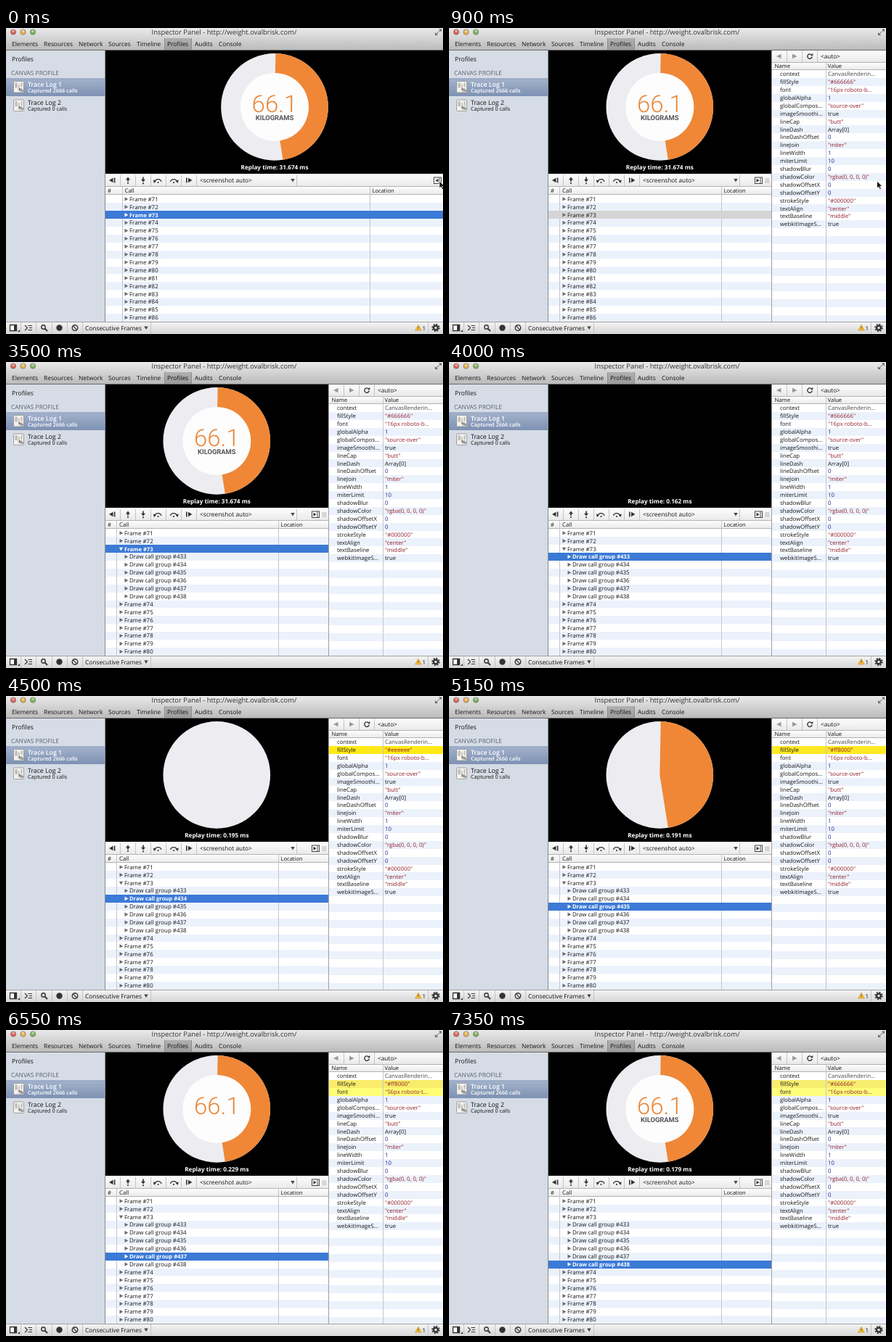
Animation, 602 px wide and 422 px high, one loop 7400 ms. Source, as an HTML page:

```html
<!DOCTYPE html>
<html lang="en">
<head>
<meta charset="utf-8">
<title>Canvas profile replay</title>
<style>
  html, body { margin: 0; width: 100%; height: 100%; overflow: hidden; background: #fff; }
  svg { display: block; width: 602px; height: 422px; }
  text { font-family: "Open Sans", "Noto Sans", sans-serif; text-rendering: geometricPrecision; white-space: pre; }
  .dial { font-family: Roboto, sans-serif; }
</style>
</head>
<body>
<svg viewBox="0 0 602 422" xmlns="http://www.w3.org/2000/svg">
  <defs>
    <linearGradient id="top" x2="0" y2="1"><stop stop-color="#e9e9e9"/><stop offset="1" stop-color="#bababa"/></linearGradient>
    <linearGradient id="bar" x2="0" y2="1"><stop stop-color="#fdfdfd"/><stop offset="1" stop-color="#e9e9e9"/></linearGradient>
    <linearGradient id="foot" x2="0" y2="1"><stop stop-color="#f5f5f5"/><stop offset="1" stop-color="#d6d6d6"/></linearGradient>
    <linearGradient id="pick" x2="0" y2="1"><stop stop-color="#a4b3cc"/><stop offset="1" stop-color="#7d91b3"/></linearGradient>
  </defs>
  <g id="chrome"></g>
  <g id="main"></g>
  <g id="panel"></g>
  <path id="cursor" d="M0 0V10.2L2.4 8L4 11.7L5.8 10.9L4.2 7.3H7.3Z" fill="#111" stroke="#fff" stroke-width=".8"/>
</svg>
<script>
const LOOP = 7400, PITCH = 10.9, TINT = '#ecf2fc', INK = '#141414';
const byId = id => document.getElementById(id);
const esc = s => s.replace(/&/g, '&amp;').replace(/</g, '&lt;');

// Small builders for SVG markup
const rect = (x, y, w, h, fill, more = '') =>
  `<rect x="${x}" y="${y}" width="${w}" height="${h}" fill="${fill}" ${more}/>`;
const disc = (x, y, r, fill, more = '') => `<circle cx="${x}" cy="${y}" r="${r}" fill="${fill}" ${more}/>`;
const path = (d, fill = '#333', more = '') => `<path d="${d}" fill="${fill}" ${more}/>`;
const line = (d, color = '#333', width = 1.3) => path(d, 'none', `stroke="${color}" stroke-width="${width}"`);
const text = (x, y, s, size = 8, fill = INK, more = '') =>
  `<text x="${x}" y="${y}" font-size="${size}" fill="${fill}" ${more}>${esc(s)}</text>`;
const seps = (xs, y, h, color = '#c4c4c4') => xs.map(x => rect(x, y, 1, h, color)).join('');
const right = (x, y, fill = '#666') => path(`M${x - 2} ${y - 2.7}L${x + 2.8} ${y}L${x - 2} ${y + 2.7}Z`, fill);
const down = (x, y, fill = '#666') => path(`M${x - 2.7} ${y - 2}H${x + 2.7}L${x} ${y + 2.6}Z`, fill);

// A table row, snapped to whole pixels
const stripe = (x, y, w, fill, more) => {
  const a = Math.round(y), b = Math.min(405, Math.round(y + PITCH));
  return rect(x, a, w, b - a, fill, more);
};

const BOLD = 'font-weight="700"';
const MID = 'text-anchor="middle"';

function chrome() {
  const tabs = [['Elements', 8], ['Resources', 52], ['Network', 100], ['Sources', 141], ['Timeline', 180],
    ['Profiles', 222], ['Audits', 260], ['Console', 293]];
  let s = rect(0, 0, 602, 31, 'url(#top)');
  [['#dd6055', 10], ['#e3b04c', 23.5], ['#7ab356', 37]].forEach(([c, x]) => {
    s += disc(x, 5.6, 3.7, c, 'stroke="#777" stroke-width=".7"') + disc(x, 4.2, 1.6, '#fff', 'opacity=".5"');
  });
  s += text(300.5, 8.9, 'Inspector Panel - http://weight.ovalbrisk.com/', 9.45, '#333', MID);
  s += path('M596 1.5H600V5.5ZM591 6V10H595Z', '#666') + line('M592 9L599 2.4', '#666', 1);
  s += rect(218, 14, 38, 16, '#000', 'opacity=".17"') + seps([218, 255], 14, 16, '#8d8d8d');
  tabs.forEach(([n, x]) => { s += text(x, 25.1, n, 8.4); });
  s += rect(0, 30, 602, 1, '#6a6a6a');

  s += rect(0, 31, 136, 375, '#d6dce5') + rect(136, 31, 1, 375, '#868a92');
  s += text(8, 45.7, 'Profiles', 8.6) + text(7, 65.3, 'CANVAS PROFILE', 8.4, '#59626f');
  s += rect(0, 69.5, 136, 24.5, 'url(#pick)') + rect(0, 69.5, 136, 1, '#8c9fbe');
  [['Trace Log 1', 'Captured 2666 calls', 69.5, '#fff', 'font-weight="600"'],
   ['Trace Log 2', 'Captured 0 calls', 95, INK, '']].forEach(([a, b, y, c, w]) => {
    s += rect(10.5, y + 4, 14, 15.5, '#f4f2ee', 'stroke="#8f8f8f" stroke-width=".8" rx="1"');
    s += rect(12.5, y + 6, 3, 7, '#b9b9b9') + rect(16.5, y + 8, 2.5, 9, '#cfcac2') + rect(20.5, y + 6, 2, 6, '#c0bcb5');
    s += text(17.5, y + 18, '%', 7, '#666', BOLD);
    s += text(30, y + 11.2, a, 8.75, c, w) + text(30, y + 19.4, b, 7.3, c, w);
  });

  s += rect(0, 405, 602, 17, 'url(#foot)') + rect(0, 405, 602, 1, '#a2a2a2');
  s += seps([20, 41, 63, 84, 105, 199], 406, 16);
  s += path('M5.5 409.5H14.5V417.5H5.5Z', '#fff', 'stroke="#333" stroke-width="1.3"') + rect(11, 410, 3.5, 7.5, '#333');
  s += path('M16 419H19V416Z');
  s += line('M26 410L29.5 413.5L26 417M30.5 410.5H36M32 413.5H36M30.5 416.5H36', '#333', 1.2);
  s += disc(51.5, 412.5, 2.7, 'none', 'stroke="#333" stroke-width="1.4"') + line('M53.5 414.5L57 418', '#333', 1.8);
  s += disc(73.5, 413.5, 4.2, '#333') + disc(95, 413.5, 3.8, 'none', 'stroke="#333" stroke-width="1.4"');
  s += line('M92.4 410.9L97.6 416.1');
  s += text(109, 416.6, 'Consecutive Frames', 8.35) + down(193, 413.5, '#444');
  s += path('M568 409.3L572.3 417H563.7Z', '#f4bd35', 'stroke="#c48a1c" stroke-width=".6"') + rect(567.6, 411.8, .9, 3, '#553');
  s += text(573.5, 416.6, '1', 8) + seps([581], 406, 16);
  s += disc(592, 413.5, 3, 'none', 'stroke="#333" stroke-width="2.4"');
  s += disc(592, 413.5, 4.9, 'none', 'stroke="#333" stroke-width="1.6" stroke-dasharray="1.92 1.92"');
  return s;
}

function dial(cx, step, ms) {
  const cy = 108.9, R = 73.8;
  const at = deg => {
    const a = deg * Math.PI / 180;
    return `${cx + R * Math.sin(a)} ${cy - R * Math.cos(a)}`;
  };
  const parts = [
    disc(cx, cy, R, '#ededf1'),
    path(`M${cx} ${cy}L${at(1.1)}A${R} ${R} 0 0 1 ${at(171)}Z`, '#ef8737'),
    disc(cx, cy, 47, '#fdfdfd'),
    text(cx, 115.5, '66.1', 33, '#e8873a', `class="dial" font-weight="300" ${MID}`),
    text(cx, 127.3, 'KILOGRAMS', 9.4, '#55555b', `class="dial" font-weight="600" ${MID}`)
  ];
  return parts.slice(0, step).join('') + text(cx, 194.6, `Replay time: ${ms} ms`, 8.2, '#fff', `${BOLD} ${MID}`);
}

function replayBar(open, edge) {
  let s = rect(137, 201, edge - 137, 18, 'url(#bar)') + rect(137, 218, edge - 137, 1, '#b4b4b4');
  s += seps([157, 178, 199, 220, 241, 262, 400], 203, 15);
  s += path('M142 210L147.5 206.8V213.2Z') + rect(148.8, 206.5, 1.6, 7, '#333');
  s += path('M168 205.5L171 209.5H165Z') + rect(167.2, 209, 1.6, 3, '#333') + disc(168, 214, 1.1, '#333');
  s += path('M189 212.5L192 208.8H186Z') + rect(188.2, 205.5, 1.6, 4, '#333') + disc(189, 214.3, 1.1, '#333');
  s += line('M205 212A4.6 4.2 0 0 1 214 212') + path('M202.8 209.5L207 210.8L204 214Z') + disc(209.5, 213, 1.1, '#333');
  s += line('M226.5 212A4.6 4.2 0 0 1 235.5 212') + path('M237.8 209.5L233.6 210.8L236.6 214Z') + disc(231, 213, 1.1, '#333');
  s += rect(248, 206.5, 1.6, 7, '#333') + path('M251 206.8L256.5 210L251 213.2Z');
  s += text(267, 212.7, '<screenshot auto>', 8.3) + down(395, 210, '#444');
  const bx = open ? 421.5 : 589.5;
  s += rect(bx, 206, 10, 8.5, '#fff', 'stroke="#444"');
  s += open ? path(`M${bx + 2} 207.7L${bx + 6} 210.2L${bx + 2} 212.8Z`) : path(`M${bx + 6} 207.7L${bx + 2} 210.2L${bx + 6} 212.8Z`);
  s += rect(bx + 7, 206.5, 1, 7.5, '#444');
  return s + (open ? seps([436, 438, 440], 207, 7, '#bbb') : '');
}

function callRows({ open, sel, focus, expanded }, edge) {
  const labelX = open ? 163 : 170, rows = [];
  for (let n = 71; n <= 86; n++) {
    const own = expanded && n === 73;
    rows.push({ label: `Frame #${n}`, x: labelX, own });
    for (let g = 433; own && g <= 438; g++) rows.push({ label: `Draw call group #${g}`, x: labelX + 7 });
  }
  const [c1, c2] = open ? [152, 375] : [160, 501], w = edge - 137;
  let s = rect(137, 219, w, 186, '#fff') + rect(137, 219, w, 11, 'url(#bar)') + rect(137, 229, w, 1, '#b4b4b4');
  s += text(140, 227, '#', 7.6) + text(open ? 156 : 163.5, 227, 'Call', 7.8) + text(c2 + 3.5, 227, 'Location', 7.6);
  let marks = '';
  rows.slice(0, 16).forEach((r, i) => {
    const y = 230.4 + PITCH * i, on = r.label === sel, blue = on && focus;
    if (i % 2) s += stripe(137, y, w, TINT);
    if (on) marks += stripe(137, y, w, blue ? '#3b7ad6' : '#d5d5d5');
    marks += (r.own ? down : right)(r.x - 4.5, y + 5.5, blue ? '#fff' : '#6b6b6b');
    marks += text(r.x, y + 8.3, r.label, blue ? 7.6 : 7.95, blue ? '#fff' : INK, blue ? BOLD : '');
  });
  return s + seps([c1, c2], 219, 186, '#c2c5ce') + marks;
}

function drawMain(st) {
  const edge = st.open ? 444 : 602;
  return rect(137, 31, edge - 137, 171, '#000') + dial(st.open ? 290.3 : 370, st.step, st.ms) +
    callRows(st, edge) + replayBar(st.open, edge);
}

function drawPanel(st) {
  if (!st.open) return '';
  const props = [['context', 'CanvasRenderin…'], ['fillStyle', `"${st.fill}"`], ['font', `"${st.font}…`],
    ['globalAlpha', '1'], ['globalCompos…', '"source-over"'], ['imageSmoothi…', 'true'], ['lineCap', '"butt"'],
    ['lineDash', 'Array[0]'], ['lineDashOffset', '0'], ['lineJoin', '"miter"'], ['lineWidth', '1'],
    ['miterLimit', '10'], ['shadowBlur', '0'], ['shadowColor', '"rgba(0, 0, 0, 0)"'], ['shadowOffsetX', '0'],
    ['shadowOffsetY', '0'], ['strokeStyle', '"#000000"'], ['textAlign', '"center"'],
    ['textBaseline', '"middle"'], ['webkitImageS…', 'true']];
  const ink = v => v[0] === '"' ? '#8f1d28' : /^\d/.test(v) ? '#22228c' : v[0] === 'C' ? '#444' : INK;
  let s = rect(444, 31, 158, 374, '#fff') + rect(445, 31, 157, 16, 'url(#bar)') + rect(445, 47, 157, 1, '#b4b4b4');
  s += seps([465, 486, 507], 31, 16);
  s += path('M451 39L457.5 35.8V42.2Z', '#999') + path('M479.5 39L473 35.8V42.2Z', '#999');
  s += line('M499.6 37.2A3.2 3.2 0 1 0 500.2 39.6', '#333', 1.4) + path('M498 38.2H501.3V34.8Z');
  s += text(512, 41.6, '<auto>', 8.2);
  s += rect(445, 48, 157, 10, 'url(#bar)') + rect(445, 57, 157, 1, '#b4b4b4');
  s += text(448.5, 55.4, 'Name', 7.7) + text(521.5, 55.4, 'Value', 7.7);
  const top = i => 58.1 + PITCH * i;
  for (let i = 1; i < 32; i += 2) s += stripe(445, top(i), 157, TINT);
  if (st.fillFlash) s += stripe(445, top(1), 157, '#ffea18', 'class="flash"');
  if (st.fontFlash) s += stripe(445, top(2), 157, '#fffd28', 'class="flash"');
  s += seps([519], 48, 357, '#c2c5ce') + rect(444, 31, 1, 374, '#a59a9f');
  props.forEach(([k, v], i) => {
    s += text(456, top(i) + 8.1, k, 7.8) + text(522, top(i) + 8.1, v, 7.8, ink(v));
  });
  return s;
}

// Each entry changes only the listed fields
const pickGroup = (n, step, ms, fill) => ({ sel: `Draw call group #${n}`, step, ms, fill, fillFlash: step > 0 });
const steps = [
  [0, { open: false, sel: 'Frame #73', focus: true, expanded: false, step: 5, ms: '31.674', fill: '#666666', font: '16px roboto-b' }],
  [400, { open: true, focus: false }],
  [2800, { focus: true }],
  [3450, { expanded: true }],
  [3950, pickGroup(433, 0, '0.162', '#666666')],
  [4500, pickGroup(434, 1, '0.195', '#eeeeee')],
  [5050, pickGroup(435, 2, '0.191', '#ff8000')],
  [5650, pickGroup(436, 3, '0.188', '#ffffff')],
  [5900, { ...pickGroup(437, 4, '0.229', '#ff8000'), font: '56px roboto-t', fontFlash: true }],
  [6650, { ...pickGroup(438, 5, '0.179', '#666666'), font: '16px roboto-b' }]
];
let acc = {};
const states = steps.map(([at, change]) => (acc = { ...acc, ...change, at }));

// Pointer: time, x, y
const route = [[0, 597, 211], [350, 597, 211], [1100, 588, 211], [1800, 475, 66], [2150, 474.5, 60],
  [2450, 472, 66], [2800, 329, 257], [3450, 329, 257]];

function pointer(t) {
  const i = route.findIndex(p => p[0] > t);
  if (i < 0) return null;
  const [t0, x0, y0] = route[i - 1], [t1, x1, y1] = route[i];
  const u = (t - t0) / (t1 - t0), e = u * u * (3 - 2 * u);
  return [x0 + (x1 - x0) * e, y0 + (y1 - y0) * e];
}

const main = byId('main'), panel = byId('panel'), cursor = byId('cursor');
let shown = null;
byId('chrome').innerHTML = chrome();

function render(t) {
  const st = states.filter(s => s.at <= t).pop();
  if (st !== shown) {
    main.innerHTML = drawMain(st);
    panel.innerHTML = drawPanel(st);
    shown = st;
  }
  const glow = 1 - (t - st.at) / 1800;
  panel.querySelectorAll('.flash').forEach(r => r.setAttribute('opacity', glow));
  const p = pointer(t);
  cursor.style.display = p ? '' : 'none';
  if (p) cursor.setAttribute('transform', `translate(${p[0]} ${p[1]})`);
}

const start = performance.now();
function tick() {
  render((performance.now() - start) % LOOP);
  requestAnimationFrame(tick);
}
tick();
</script>
</body>
</html>
```
